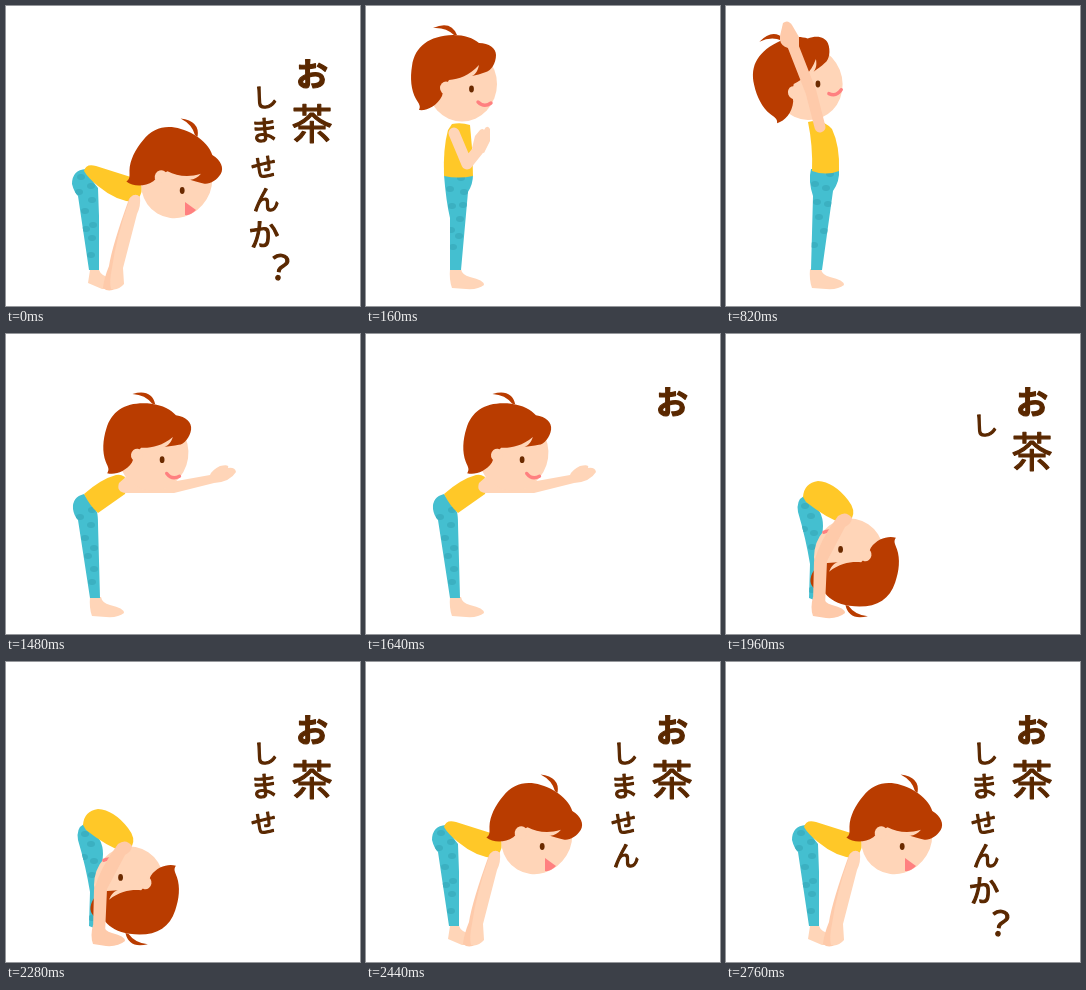
An HTML page with a canvas for the animation above (2.92 s loop, 354 px wide and 300 px high).

```html
<!DOCTYPE html>
<html lang="ja">
<head>
<meta charset="utf-8">
<title>お茶しませんか？</title>
<style>
html, body { margin: 0; width: 100%; height: 100%; overflow: hidden; background: #fff; }
canvas { display: block; }
</style>
</head>
<body>
<canvas id="stage" width="354" height="300"></canvas>
<script>
const ctx = document.getElementById('stage').getContext('2d');
const LOOP = 2920, STEP = 160, TEXT_START = 1640;
const SKIN = '#ffd5b8', ARM = '#fecaaa', HAIR = '#b93c00', SHIRT = '#ffc828',
  TEAL = '#44bfd0', DOT = '#3bb0c1', PINK = '#ff8080', BROWN = '#5a2800';

const fill = (color, path) => { ctx.fillStyle = color; ctx.fill(new Path2D(path)); };

function line(color, width, path) {
  ctx.strokeStyle = color;
  ctx.lineWidth = width;
  ctx.lineCap = ctx.lineJoin = 'round';
  ctx.stroke(new Path2D(path));
}

function oval(color, x, y, rx, ry = rx) {
  ctx.fillStyle = color;
  ctx.beginPath();
  ctx.ellipse(x, y, rx, ry, 0, 0, Math.PI * 2);
  ctx.fill();
}

function rotated(x, y, degrees, draw) {
  ctx.save();
  ctx.translate(x, y);
  ctx.rotate(degrees * Math.PI / 180);
  draw();
  ctx.restore();
}

// The head pivots around the ear.
function head(x, y, degrees, smiling = true) {
  rotated(x, y, degrees, () => {
    oval(SKIN, 17, -4, 35, 37.5);
    fill(HAIR, 'M-26 22C-24 18-26 16-29 11C-34 2-35-10-33-22C-30-42-16-52 8-53C20-53 28-50 34-45C44-45 51-40 51-33C51-25 46-17 41-16C36-14 31-13 27-12C31-14 33-18 34-23C24-12 14-9 4-8L-1 0L-3 8C-8 18-18 23-26 22Z');
    fill(HAIR, 'M-12-60Q6-68 12-53L9-53Q1-61-12-60Z');
    oval(SKIN, 1, 0, 6, 6.5);
    rotated(26.5, 1, -degrees, () => oval('#6b2a00', 0, 0, 2.4, 3.4));
    if (smiling) line(PINK, 3.4, 'M33 14Q39 20 46 15');
  });
}

function legs(path, dots) {
  ctx.save();
  fill(TEAL, path);
  ctx.clip(new Path2D(path));
  for (const [x, y] of dots) oval(DOT, x, y, 4, 3);
  ctx.restore();
}

const foot = () => fill(SKIN, 'M84 263L95 263Q96 269 104 271Q118 274 118 279Q112 284 100 283L86 282Q83 274 84 263Z');

function pray() {
  foot();
  legs('M78 169L107 169Q107 178 102 186L95 264L84 264L84 212Q80 195 78 169Z',
    [[95, 172], [84, 183], [98, 186], [86, 200], [97, 199], [94, 213], [85, 224], [93, 230], [87, 241]]);
  fill(SHIRT, 'M86 118Q95 116 104 119Q107 145 107 170Q92 173 78 170Q77 142 82 124Z');
  line(SKIN, 11, 'M88 127L101 158L113 143');
  fill(SKIN, 'M106 142L109 130L114 124Q117 122 118 124Q121 118 124 123L124 135L118 147Z');
  head(79, 82, 0);
}

function stretch() {
  foot();
  legs('M85 163L113 163Q114 175 107 185L96 264L85 264L87 190Q82 175 85 163Z',
    [[104, 168], [89, 178], [100, 182], [91, 196], [102, 198], [93, 211], [98, 225], [88, 239]]);
  fill(SHIRT, 'M82 116Q96 112 106 123Q114 140 113 165Q100 170 86 165Q87 140 82 116Z');
  head(67, 87, -22);
  line(ARM, 11, 'M94 121L85 86L67 40');
  fill(ARM, 'M54 30L57 17Q62 13 66 19L73 31L73 41L62 42Q55 40 54 34Z');
}

function reach() {
  foot();
  legs('M78 160Q66 163 67 175Q68 182 72 186L84 264L94 264L92 190Q92 182 91 178Z',
    [[86, 176], [74, 183], [85, 191], [79, 204], [88, 214], [82, 222], [88, 235], [86, 248]]);
  fill(SHIRT, 'M78 160Q95 145 110 141Q118 139 122 148L119 160L92 179Q84 172 78 160Z');
  fill(SKIN, 'M122 141L113 149Q110 158 120 159L168 159L208 149Q224 148 230 138Q229 133 222 134Q224 130 214 132Q206 136 204 141L165 148Z');
  head(130, 121, 8);
}

function fold() {
  legs('M78 162Q70 166 72 178Q80 205 84 230L83 264L88 266L94 240L97 192Q97 176 85 170Z',
    [[79, 172], [85, 182], [78, 195], [88, 199], [86, 213], [86, 256]]);
  fill(ARM, 'M87 263L98 263Q98 269 106 271Q119 274 119 279Q112 285 100 284L87 282Q84 274 87 263Z');
  fill(SHIRT, 'M77 163Q78 149 92 147Q108 148 122 166Q130 176 126 184L118 190Q100 184 80 168Z');
  head(140.5, 221, 190);
  fill(ARM, 'M112 182Q120 176 126 184Q126 189 119 193L101 227L99 272Q98 280 88 280Q85 276 87 268L88 228Q94 206 112 182Z');
}

function touchFloor() {
  legs('M80 163Q66 164 66 178Q68 186 72 190L83 264L93 264L93 210L92 182Q84 172 80 163Z',
    [[75, 171], [85, 180], [73, 186], [86, 194], [79, 205], [87, 219], [80, 223], [86, 232], [85, 249]]);
  fill(SKIN, 'M84 264L93 264Q95 270 105 272L106 283L96 283L82 277Z');
  fill(SHIRT, 'M78 165Q80 157 90 160Q112 167 128 172L136 180Q136 192 128 196Q110 195 92 180Q82 172 78 165Z');
  fill(ARM, 'M123 193Q128 187 132 190L110 282Q103 287 97 282Q98 272 103 260Q106 240 123 193Z');
  fill(SKIN, 'M124 192Q129 186 134 191Q135 200 131 208L117 262L118 278Q112 285 105 283Q103 276 106 262Q110 232 124 192Z');
  head(154, 170, 31, false);
  fill(PINK, 'M179 196L190 204Q184 210 179 209Z');
}

const poses = [[0, touchFloor], [160, pray], [820, stretch], [1480, reach], [1960, fold], [2440, touchFloor]];

// character, centre x, centre y, size, tilt, weight
const letters = [
  ['お', 306, 67.5, 32, 0, 700], ['茶', 306, 117, 41, 0, 500], ['し', 259, 91, 26, -4, 500], ['ま', 258, 124, 28, -4, 500],
  ['せ', 258, 161, 26, -9, 500], ['ん', 260, 194, 27, 0, 500], ['か', 258, 228, 31, -4, 500], ['？', 274, 261, 34, 8, 400]
];

function letter([char, x, y, size, tilt, weight]) {
  rotated(x, y, tilt, () => {
    ctx.font = `${weight} ${size}px "Noto Sans CJK JP", "Noto Sans CJK", sans-serif`;
    ctx.textAlign = 'center';
    ctx.fillStyle = ctx.strokeStyle = BROWN;
    ctx.lineWidth = 1.2;
    ctx.lineJoin = 'round';
    ctx.fillText(char, 0, size * 0.38);
    ctx.strokeText(char, 0, size * 0.38);
  });
}

function lettersShown(t) {
  if (t < STEP) return letters.length;
  return Math.max(0, Math.floor((t - TEXT_START) / STEP) + 1);
}

function draw(t) {
  ctx.fillStyle = '#fff';
  ctx.fillRect(0, 0, 354, 300);
  poses.findLast(([start]) => t >= start)[1]();
  letters.slice(0, lettersShown(t)).forEach(letter);
}

const began = performance.now();
function tick() {
  draw((performance.now() - began) % LOOP);
  requestAnimationFrame(tick);
}
tick();
</script>
</body>
</html>
```
